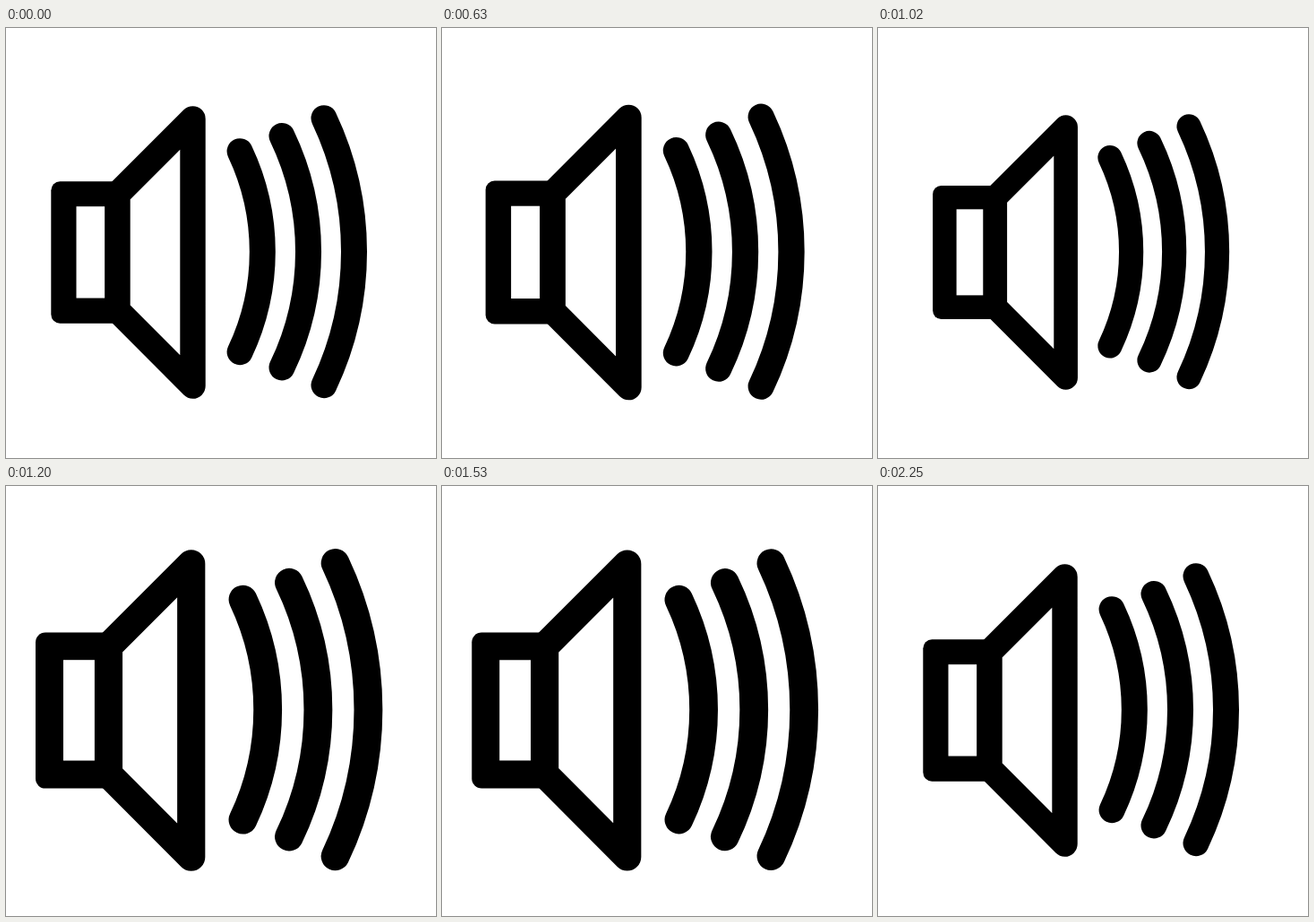
Write an HTML page with a canvas that moves like this. It is 480 by 480 pixels and loops after 2280 ms.

```html
<!DOCTYPE html>
<html lang="en">
<head>
<meta charset="utf-8">
<title>Pulsing speaker</title>
<style>
  html, body { margin: 0; width: 100%; height: 100%; overflow: hidden; background: #fff; }
  canvas { display: block; width: 480px; height: 480px; }
</style>
</head>
<body>
<canvas id="stage" width="480" height="480"></canvas>
<script>
const ctx = document.getElementById('stage').getContext('2d');

// Times in ms
const LOOP = 2280, STEP = 30;
const FIRST_PEAK = 543, RAMP = 98, SWING = 167, SWINGS = 7;
const LAST_DIP = FIRST_PEAK + SWING * SWINGS;
const BIG = 1.1, SMALL = 0.93;
const CENTER = { x: 226.5, y: 250.3 };

// Sound waves: x of the bulge, half height, bulge depth
const WAVES = [
  { x: 286.3, half: 112, depth: 25.2 },
  { x: 337.5, half: 129.2, depth: 29.5 },
  { x: 388.5, half: 149, depth: 33.5 }
];

const ease = (from, to, u) => from + (to - from) * (1 - Math.cos(Math.PI * u)) / 2;

// Rest -> big, then equal swings between big and small, then small -> rest
function scaleAt(time) {
  const t = Math.floor((time % LOOP) / STEP) * STEP;
  if (t <= FIRST_PEAK - RAMP || t >= LAST_DIP + RAMP) return 1;
  if (t < FIRST_PEAK) return ease(BIG, 1, (FIRST_PEAK - t) / RAMP);
  if (t > LAST_DIP) return ease(SMALL, 1, (t - LAST_DIP) / RAMP);
  return ease(BIG, SMALL, (t - FIRST_PEAK) / SWING);
}

function drawSpeaker() {
  ctx.fillStyle = '#000';
  ctx.beginPath();
  ctx.roundRect(50.3, 171.2, 78, 158.6, 10);
  ctx.fill();
  ctx.fillStyle = '#fff';
  ctx.fillRect(78.5, 199.2, 32, 102.3);

  ctx.lineWidth = 28.4;
  ctx.beginPath();
  ctx.moveTo(124.5, 185.4);
  ctx.lineTo(208.5, 101.4);
  ctx.lineTo(208.5, 399.6);
  ctx.lineTo(124.5, 315.3);
  ctx.closePath();
  ctx.stroke();
}

function drawWave({ x, half, depth }) {
  const radius = (half * half + depth * depth) / (2 * depth);
  const angle = Math.asin(half / radius);
  ctx.lineWidth = 29;
  ctx.beginPath();
  ctx.arc(x - radius, 249.7, radius, -angle, angle);
  ctx.stroke();
}

function draw(time) {
  const scale = scaleAt(time);
  ctx.setTransform(1, 0, 0, 1, 0, 0);
  ctx.fillStyle = '#fff';
  ctx.fillRect(0, 0, 480, 480);
  ctx.translate(CENTER.x, CENTER.y);
  ctx.scale(scale, scale);
  ctx.translate(-CENTER.x, -CENTER.y);
  ctx.strokeStyle = '#000';
  ctx.lineCap = ctx.lineJoin = 'round';
  drawSpeaker();
  WAVES.forEach(drawWave);
}

let start;
function tick(now) {
  start ??= now;
  draw(now - start);
  requestAnimationFrame(tick);
}
draw(0);
requestAnimationFrame(tick);
</script>
</body>
</html>
```
